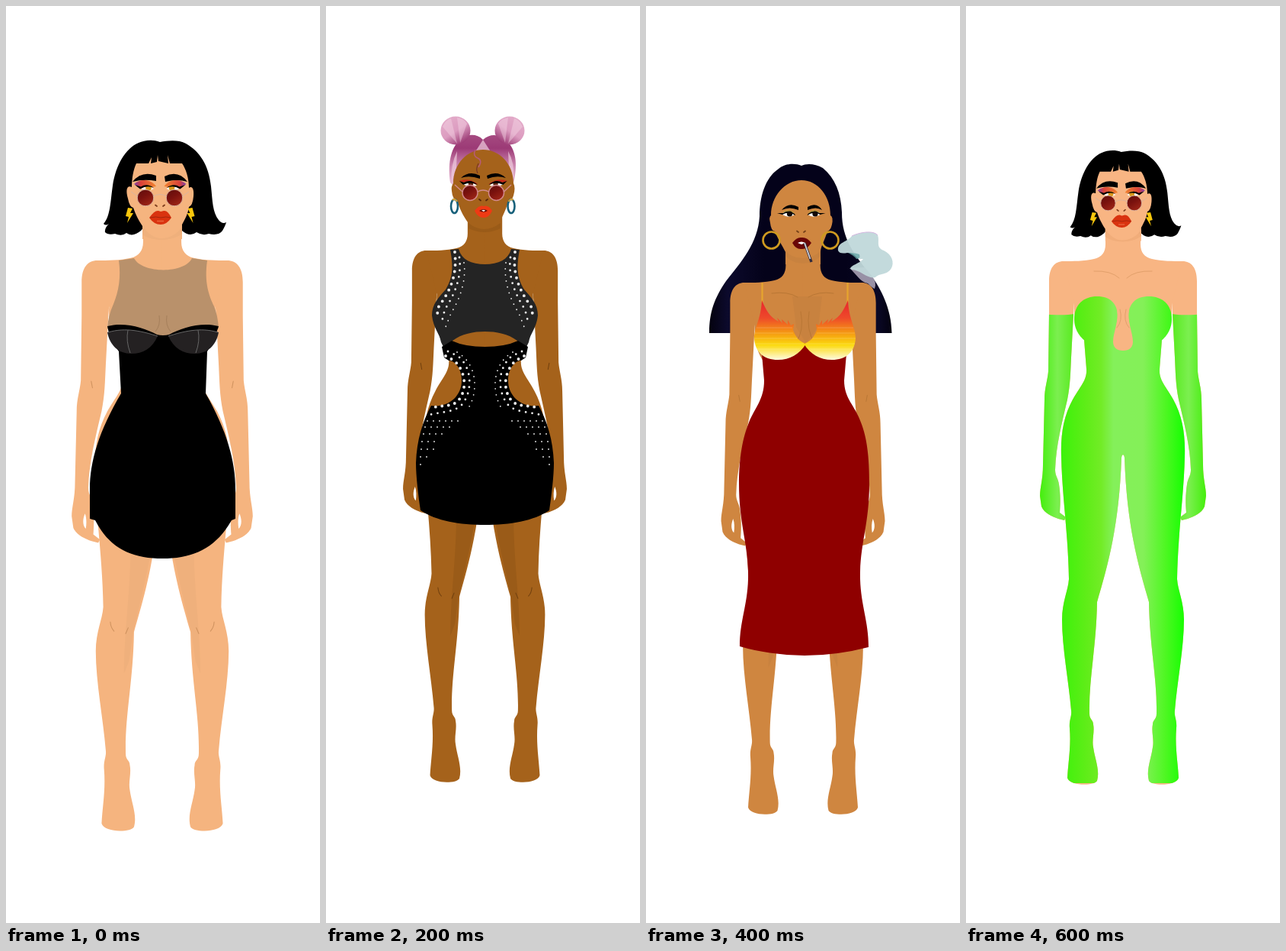
An HTML page that plays this animation: 412 px wide and 1200 px high, repeating every 800 ms.

```html
<!DOCTYPE html>
<html lang="en">
<head>
<meta charset="utf-8">
<title>Four looks</title>
<style>
html, body { margin: 0; width: 100%; height: 100%; overflow: hidden; background: #fff; }
svg { display: block; width: 412px; height: 1200px; }
.look { opacity: 0; animation: show 800ms step-end infinite; }
#mesh { --skin: #f5b47f; --shade: #efb07c; --line: #d0935f; }
#studs { --skin: #a5621b; --shade: #9a5b18; --line: #6f3f0e; animation-delay: -600ms; }
#flame { --skin: #cf8640; --shade: #c8823f; --line: #b97735; animation-delay: -400ms; }
#suit { --skin: #f8b583; --shade: #f1ad7a; --line: #e2a06b; animation-delay: -200ms; }
@keyframes show { 0% { opacity: 1 } 25%, 100% { opacity: 0 } }
.skin { fill: var(--skin); }
.shade { fill: var(--shade); }
.line { fill: none; stroke: var(--line); stroke-linecap: round; }
.dots { fill: none; stroke: #eee; stroke-linecap: round; }
</style>
</head>
<body>
<svg viewBox="0 0 412 1200" xmlns="http://www.w3.org/2000/svg">
<defs>
  <linearGradient id="green" gradientUnits="userSpaceOnUse" x1="125" x2="288">
    <stop offset="0" stop-color="#3cf20a"/><stop offset=".2" stop-color="#5fed18"/>
    <stop offset=".32" stop-color="#72ec26"/><stop offset=".42" stop-color="#84f05a"/>
    <stop offset=".66" stop-color="#84f058"/><stop offset=".84" stop-color="#4ef722"/>
    <stop offset="1" stop-color="#12ff00"/>
  </linearGradient>
  <linearGradient id="glove" gradientUnits="userSpaceOnUse" x1="99" x2="141">
    <stop offset="0" stop-color="#48ef12"/><stop offset=".5" stop-color="#7cef50"/><stop offset="1" stop-color="#58eb20"/>
  </linearGradient>
  <linearGradient id="fire" gradientUnits="userSpaceOnUse" x1="0" y1="385" x2="0" y2="463">
    <stop offset="0" stop-color="#e8242c"/><stop offset=".3" stop-color="#ee4a2a"/>
    <stop offset=".55" stop-color="#f59a12"/><stop offset=".75" stop-color="#fbd90e"/><stop offset="1" stop-color="#fffbe0"/>
  </linearGradient>
  <linearGradient id="pink" x1="0" y1="1" x2="0" y2="0">
    <stop offset="0" stop-color="#efcade"/><stop offset=".4" stop-color="#cf8bb3"/><stop offset=".75" stop-color="#9c3a76"/><stop offset="1" stop-color="#a54a80"/>
  </linearGradient>
  <linearGradient id="bun" x1=".2" y1=".1" x2=".8" y2=".95">
    <stop offset="0" stop-color="#e3abc9"/><stop offset=".5" stop-color="#dc9cc0"/><stop offset="1" stop-color="#96336f"/>
  </linearGradient>
  <linearGradient id="night" x1="0" x2="1">
    <stop offset="0" stop-color="#04020f"/><stop offset=".1" stop-color="#0c0a2c"/><stop offset=".3" stop-color="#04021a"/>
    <stop offset=".75" stop-color="#04021a"/><stop offset=".92" stop-color="#0a0826"/><stop offset="1" stop-color="#04020f"/>
  </linearGradient>
  <linearGradient id="lens" x1="0" y1="0" x2=".6" y2="1">
    <stop offset="0" stop-color="#5e0e0c"/><stop offset=".5" stop-color="#7a120e"/><stop offset="1" stop-color="#9c2416"/>
  </linearGradient>
  <linearGradient id="lid" x1="0" x2="1">
    <stop offset="0" stop-color="#7a3bb0"/><stop offset=".3" stop-color="#d8413a"/><stop offset="1" stop-color="#f2842e"/>
  </linearGradient>

  <!-- shared body, mirrored around x = 206 -->
  <path id="arm" fill-rule="evenodd" d="M150 334H128C116 334 109 343 109 360V400L108 478C107 490 103 500 103 515L101 600C101 620 97 630 97 641L99 655C103 664 113 668 121 671L129 673L131 669L123 663C124 650 124 640 122 626C121 618 117 615 117 607C118 575 126 545 133 515C137 495 137 480 138 460L141 403L142 388L150 380ZM113 638C110 645 110 652 114 656C115 650 115 643 113 638Z"/>
  <path id="trunk" d="M206.5 290H183V312C183 322 178 329 168 331C155 334 140 334 128 334L142 390C141 405 144 425 155 437L158 475C159 490 150 497 140 515C128 537 124 560 125 590C126 640 134 690 135 750C134 765 126 780 126 803C126 840 135 885 138 922C139 930 135 934 136 945C138 970 134 990 133 1010C136 1021 168 1021 172 1014C176 1000 169 985 167 970C165 960 169 950 167 940C167 934 162 934 162 926C161 880 171 840 172 780C184 738 201 685 204 591Q204.5 587 206.5 587Z"/>
  <g id="half">
    <use href="#arm" class="skin"/>
    <use href="#trunk" class="skin"/>
    <path class="shade" d="M168 680H193C186 720 178 750 171 780L166 815L160 830C160 780 167 740 168 680Z"/>
    <path class="line" d="M143.500 768Q144 775 148 779M165 775L162 782M120.500 479L122 487"/>
  </g>
  <g id="body">
    <use href="#half"/>
    <use href="#half" transform="matrix(-1 0 0 1 412 0)"/>
  </g>
  <clipPath id="trunkClip">
    <use href="#trunk"/>
    <use href="#trunk" transform="matrix(-1 0 0 1 412 0)"/>
  </clipPath>
  <clipPath id="armClip"><use href="#arm"/></clipPath>
  <path id="gloveArm" clip-path="url(#armClip)" fill="url(#glove)" d="M90 402Q125 406 142 403V690H90Z"/>

  <!-- bob haircut, round sunglasses -->
  <path id="bolt" fill="#f8c70c" d="M160 264L166 265L163 271L167 271L159 284L161 276L157 275Z"/>
  <g id="bob">
    <path d="M202 178C192 174 181 176 174 179C157 186 144 208 140 235C137 256 137 275 128 285Q131 288 135 285Q129 291 130 296Q134 300 143 298Q152 302 158 297Q166 303 177 294L184 286H226L231 294Q241 303 250 296Q258 301 266 298Q279 301 284 294Q288 287 289 283Q284 286 279 280C271 270 271 255 269 236C266 208 254 190 236 180C227 175 213 176 202 178Z"/>
    <path class="skin" d="M171 206C167 214 165 226 165 237C158 234 157 242 160 252Q162 263 167 264C170 273 175 282 179 288V305H231V286C235 279 239 271 240 263Q245 261 246 249C247 239 244 235 240 238C240 225 236 213 231 206L215 206L212 195L213 206L200 203L199 195L198 204L190 206L191 198L187 206Z"/>
    <path class="shade" d="M179 288C187 299 194 303 203 304C215 304 225 298 231 289V298C219 308 192 309 179 299Z"/>
    <path d="M166 230Q178 215 197 222V229Q181 226 166 230ZM208 223Q226 214 238 230Q225 226 209 230Z"/>
    <g id="bobEye">
      <path fill="url(#lid)" d="M168 233C176 226 190 226 197 236L178 239Z"/>
      <path fill="#fff" d="M177 239Q186 233 194 239L186 243Z"/>
      <circle cx="187" cy="238" r="3.800" fill="#d9961a"/>
      <path d="M169 234L177 236.500Q185 231.500 194 238Q185 234 176 239.500Z"/>
    </g>
    <use href="#bobEye" transform="matrix(-1 0 0 1 404.500 0)"/>
    <g stroke="#d9b4a0">
      <circle cx="183" cy="251" r="10.800" fill="url(#lens)"/>
      <circle cx="221" cy="251" r="10.800" fill="url(#lens)"/>
      <path fill="none" d="M193.500 249Q202 244 210.500 249M172.500 249L164 243M231.500 249L240 243"/>
    </g>
    <path fill="none" stroke="#7d3d1d" stroke-width="1.800" stroke-linecap="round" d="M196 260.500L198 262M206 262L208 260.500"/>
    <path fill="#d9330f" d="M188 277Q195 267 200 268L203 269L207 268Q212 267 217 277Q211 286 203 286Q194 286 188 277Z"/>
    <path fill="none" stroke="#a3260c" d="M189 277Q197 275 203 277Q210 275 216 277"/>
    <path fill="none" stroke="#e8643a" stroke-width="1.500" d="M198 281.500H207"/>
    <use href="#bolt"/>
    <use href="#bolt" transform="matrix(-1 0 0 1 404.500 0)"/>
  </g>

  <g id="studHalf">
    <path fill="#242424" d="M209 338C190 338 178 332 174 318L163 319C167 340 167 355 157 371C148 381 139 390 139 405C141 422 149 428 151 440L154 446L166 438C178 429 193 426 209 426Z"/>
    <path d="M152 446L165 438Q182 446 209 446V679C175 679 145 674 124 660C121 640 118 615 118 598C119 568 127 543 138 523C159 526 178 512 178 490C178 474 169 464 161 464L155 460Z"/>
    <path class="dots" stroke-width="3.900" stroke-dasharray="0 8.500" d="M169 322C172 350 165 370 148 393L145 408M157 458L168 464C184 478 186 504 172 518C163 525 150 522 139 526"/>
    <path class="dots" stroke-width="2.800" stroke-dasharray="0 8.500" d="M175 329C178 352 171 374 156 397L152 413M160 452L173 458C193 474 192 506 178 522C168 532 150 531 136 535"/>
    <path class="dots" stroke-width="1.800" stroke-dasharray="0 8" d="M181 336C184 355 178 380 164 402L157 420M172 453C202 470 199 512 184 530M133 543H180M130 551H170M128 560H160M126 570H150M125 580H142M124 590H133M124 600H125"/>
  </g>

  <g id="hoop" fill="none">
    <ellipse cx="168.500" cy="262" rx="4.500" ry="9" stroke="#17607a" stroke-width="2.600"/>
    <path d="M166 254Q169 251 172 256" stroke="#d3a340" stroke-width="2"/>
  </g>
  <g id="studEye">
    <path fill="#c5281a" d="M174 229Q188 224 199 233L186 232Z"/>
    <path fill="#fff" d="M179 233Q189 227 198 235Q188 238 179 233Z"/>
    <circle cx="190" cy="232.500" r="3.200" fill="#5a2410"/>
    <path d="M175 229L181 231Q190 226 199 234Q189 229 180 234Z"/>
  </g>
  <g id="flameEye">
    <path fill="#b89a3c" d="M179 270Q187 264 195 271Z"/>
    <path fill="#fff" d="M178 272Q186 266 195 273Q187 279 178 272Z"/>
    <path d="M172 271L180 271Q187 266 195 272L196 274Q187 268 179 273Z"/>
  </g>
</defs>

<g class="look" id="mesh">
  <use href="#body" transform="matrix(1.09 0 0 1.09 -19.540 -31.060)"/>
  <path fill="#b9916b" d="M148 333L168 330C178 350 234 351 244 330L264 333C260 362 266 378 273 393Q278 405 279 422Q240 440 206 434Q170 440 133 422Q134 405 141 390C148 373 151 355 148 333Z"/>
  <path fill="none" stroke="#a57f5b" d="M201 405Q203 418 196 426M211 405Q209 418 216 426"/>
  <path d="M133 419C155 413 182 421 198 430Q206 432 214 430C230 421 257 413 279 419L272 440L264 452L262 507C290 556 301 596 301 632V671L296 673C275 710 245 723 205.500 723C165 723 136 710 117 673L110 671V632C110 596 122 556 151 507L148 452L137 437Z"/>
  <g id="cup">
    <path fill="#242122" d="M133 427C157 420 180 426 199 432C192 448 180 455 164 455C148 455 136 444 133 427Z"/>
    <path fill="none" stroke="#666" d="M134 427C157 420 180 426 199 432M160 424Q157 438 163 454"/>
  </g>
  <use href="#cup" transform="matrix(-1 0 0 1 412 0)"/>
  <use href="#bob"/>
</g>

<g class="look" id="studs">
  <path fill="url(#pink)" d="M206 175C197 166 185 168 177 174C162 186 160 210 163 231L170 238H243L247 228C251 207 250 188 236 175C227 168 216 166 206 175Z"/>
  <path fill="#efcede" opacity=".7" d="M206 175L197 189L215 189ZM172 190Q163 208 165 230L171 212ZM239 190Q248 206 246 226L240 212Z"/>
  <g id="topknot">
    <ellipse cx="170" cy="163" rx="19.500" ry="18.500" fill="url(#bun)"/>
    <path fill="#f3d6e5" opacity=".45" d="M172 180L153 158Q157 149 164 147ZM176 179L172 146Q181 147 185 154Z"/>
  </g>
  <use href="#topknot" transform="matrix(-1 0 0 1 411 0)"/>
  <use href="#body" transform="matrix(.986 0 0 1.016 5.400 -19.300)"/>
  <path class="skin" d="M167 232C167 206 186 188 206 188C227 188 246 206 246 232Q249 238 246 248Q244 255 240 254C235 270 229 280 226 287Q208 296 189 287C182 278 176 268 172 254Q166 254 165 242Q164 236 167 232Z"/>
  <path class="shade" d="M187 284Q207 300 229 284V291Q208 301 187 291Z"/>
  <path fill="none" stroke="#b65b78" stroke-width="1.500" d="M196 188Q192 196 199 199T200 211"/>
  <path fill="none" stroke="#6c2c27" d="M200 206Q196 213 199 219"/>
  <path d="M177 225Q188 215 202 222V226Q188 221 177 225ZM211 222Q225 215 236 225Q224 221 212 226Z"/>
  <use href="#studEye"/>
  <use href="#studEye" transform="matrix(-1 0 0 1 412.500 0)"/>
  <g stroke="#d38a8d" stroke-width="1.400">
    <circle cx="189" cy="244.500" r="10" fill="url(#lens)"/>
    <circle cx="223.500" cy="244.500" r="10" fill="url(#lens)"/>
    <path fill="none" d="M199 243Q206 239 213.500 243M179 243L169 234M233.500 243L243 234"/>
  </g>
  <path fill="none" stroke="#57260a" stroke-width="1.800" stroke-linecap="round" d="M201 253L203 254.500M210 254.500L212 253"/>
  <path fill="#ee3a14" d="M195 268Q201 260 207 262Q213 260 218 268Q214 277 207 277Q199 277 195 268Z"/>
  <path fill="#5b0e08" d="M201 268Q207 264 212 268Q207 271 201 268Z"/>
  <path fill="#fff" d="M204 267.500Q207 266 209 267.500L207 269Z"/>
  <use href="#hoop"/>
  <use href="#hoop" transform="matrix(-1 0 0 1 411.500 0)"/>
  <use href="#studHalf"/>
  <use href="#studHalf" transform="matrix(-1 0 0 1 417 0)"/>
</g>

<g class="look" id="flame">
  <path fill="url(#night)" d="M204 209C195 205 182 206 174 213C156 225 149 250 149 275C147 310 125 335 105 360C90 382 83 400 83 428H115V390H297V428H322.500C322 395 308 370 295 352C273 325 257 305 257 270C256 245 248 225 232 212C222 206 210 206 204 209Z"/>
  <use href="#body" transform="matrix(.986 0 0 1.016 2.900 22.700)"/>
  <path class="skin" d="M164 274C164 249 182 228 204 228C226 228 242 249 242 274Q246 276 244 286Q242 294 238 295C234 308 229 315 229 322V338H183V322C179 314 173 305 169 295Q164 294 163 284Q161 276 164 274Z"/>
  <path class="shade" d="M183 320C192 333 219 333 229 320V327C218 340 194 340 183 327ZM192 380H231L226 420L210 441L197 420Z"/>
  <path class="line" d="M165 376Q186 373 199 381M246 376Q226 373 213 381M203 400Q208 425 197 440M214 400Q210 425 221 440"/>
  <path d="M178 267Q187 256 200 263V267Q188 262 178 267ZM212 263Q224 256 231 267Q223 262 212 267Z"/>
  <use href="#flameEye"/>
  <use href="#flameEye" transform="matrix(-1 0 0 1 407.500 0)"/>
  <circle cx="188.500" cy="272" r="3.600" fill="#120a08"/>
  <circle cx="222" cy="272" r="3.600" fill="#120a08"/>
  <path fill="none" stroke="#74411a" stroke-width="1.800" stroke-linecap="round" d="M198 294.500L200 296M207 296L209 294.500"/>
  <path fill="#690607" d="M192 310Q198 302 204 303Q211 302 217 310Q211 319 204 318Q197 319 192 310Z"/>
  <path fill="#fff" d="M199 310Q204 307 209 310L204 312Z"/>
  <path fill="none" stroke="#302a3c" stroke-width="3.400" d="M208 310L217 335"/>
  <path fill="none" stroke="#cfd0d8" stroke-width="1.800" d="M208 310L215.500 331"/>
  <g fill="none" stroke="#cf9a20" stroke-width="2.600">
    <circle cx="164.500" cy="306.500" r="11"/>
    <circle cx="241.500" cy="306.500" r="11"/>
  </g>
  <path fill="#8f0000" d="M152 455L207 441L263 455L260 490C260 514 274 522 282 545C290 565 293 590 293 625C293 680 280 705 281 750C282 785 292 805 292 839Q250 850 208 850Q160 849 123 838C123 805 133 785 134 750C135 705 122 680 122 625C122 590 127 565 135 545C143 525 155 515 155 490Z"/>
  <g id="flameCup">
    <path fill="none" stroke="#e6a52e" stroke-width="2.200" d="M152.500 362V388"/>
    <path fill="url(#fire)" d="M152 385C157 397 162 407 174 413L172 408L179 415L178 410L186 417L186 411L190 418L194 416L193 424C196 433 202 440 210 442C201 456 189 463 173 463C155 463 143 453 142 435C142 420 151 410 152 385Z"/>
    <path fill="none" stroke="#fff" stroke-width=".600" opacity=".3" d="M145 421H192M143 428H193M142 435H199M143 442H207M145 449H202"/>
  </g>
  <use href="#flameCup" transform="matrix(-1 0 0 1 417 0)"/>
  <path fill="#a9a1b5" opacity=".9" d="M267 343C276 351 281 361 291 363Q297 369 300 370Q303 362 297 354L287 342Z"/>
  <path fill="#c0d9db" opacity=".95" d="M252 320C251 309 264 309 270 301C280 296 299 293 304 300C307 308 301 316 312 320C323 325 326 336 322 343C316 353 307 349 301 355C291 358 281 345 270 345C263 341 281 337 285 331C274 332 276 323 264 323Q254 325 252 320Z"/>
  <path fill="#69a7a8" opacity=".8" d="M265 323Q276 323 280 325Q282 331 276 331Q272 326 265 323Z"/>
  <path fill="none" stroke="#d3b5df" d="M270 301C280 296 299 293 304 300"/>
</g>

<g class="look" id="suit">
  <use href="#body"/>
  <path class="line" d="M168 347Q190 346 201 356M244 347Q222 346 211 356"/>
  <path fill="url(#green)" clip-path="url(#trunkClip)" d="M120 418H292V1017H120Z"/>
  <g fill="url(#green)">
    <path d="M142 410C142 390 155 380 172 380C190 380 199 390 199 407L194 440L156 438C147 431 142 421 142 410Z"/>
    <path d="M270 410C270 390 257 380 240 380C222 380 213 390 213 407L218 440L256 438C265 431 270 421 270 410Z"/>
  </g>
  <path class="skin" d="M198 396C201 414 193 426 193 440Q194 451 206 451Q218 451 219 440C219 426 211 414 214 396Z"/>
  <path class="line" d="M202 397Q206 412 198 421M210 397Q206 412 214 421"/>
  <use href="#gloveArm"/>
  <use href="#gloveArm" transform="matrix(-1 0 0 1 412 0)"/>
  <use href="#bob" transform="matrix(.905 0 0 .917 20.800 27.800)"/>
</g>
</svg>
</body>
</html>
```
